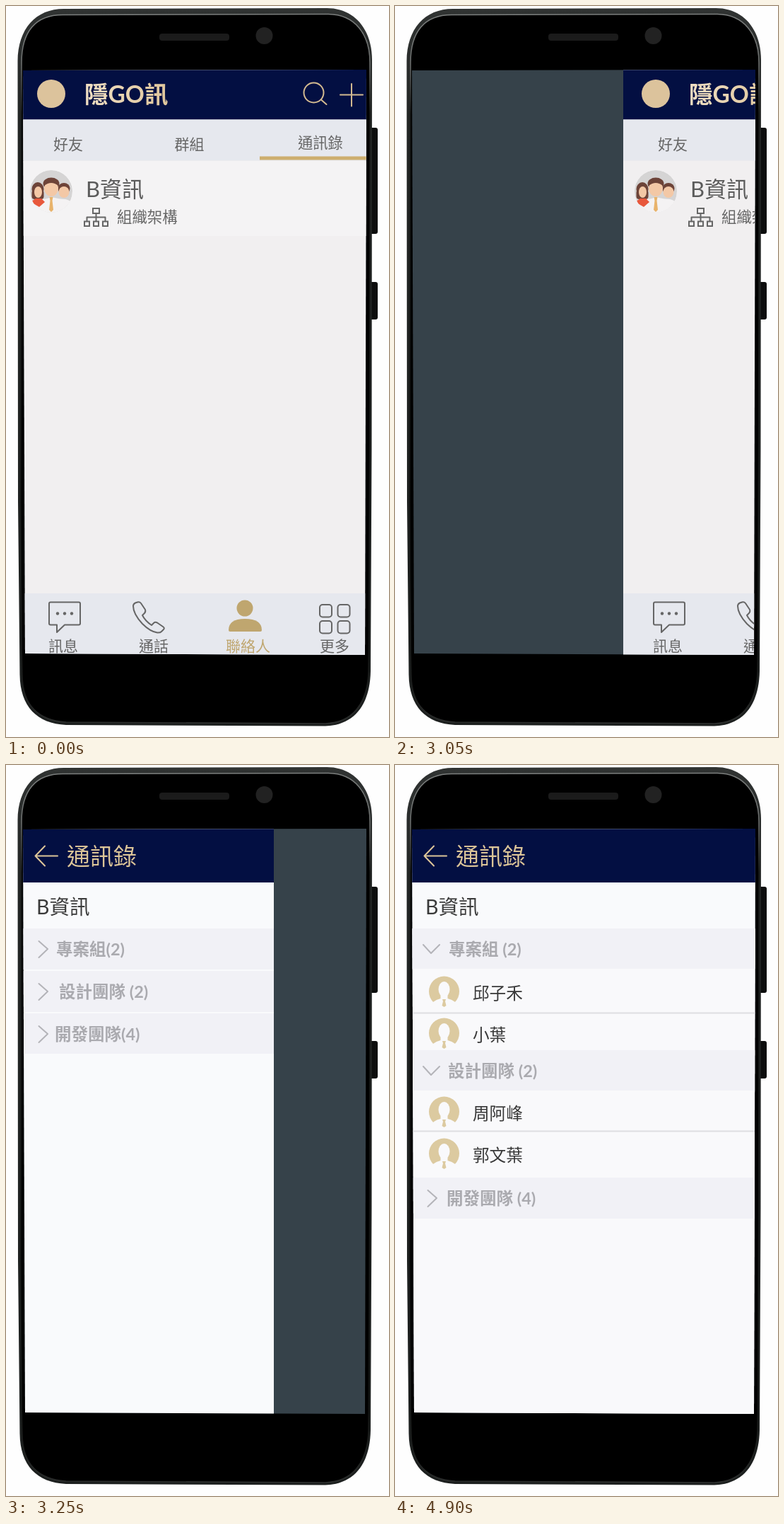
Write an HTML page that moves like this. It is 542 px wide and 1033 px high and loops after 5900 ms.

```html
<!DOCTYPE html>
<html lang="zh-Hant">
<head>
<meta charset="utf-8">
<style>
html, body { margin: 0; width: 100%; height: 100%; overflow: hidden; background: #fefefe; }
svg { display: block; width: 542px; height: 1033px; }
text { font-family: Lato, "Noto Sans CJK TC", "Noto Sans CJK JP", "Noto Sans CJK", sans-serif; white-space: pre; }
.line { fill: none; stroke-width: 2; stroke-linecap: round; stroke-linejoin: round; }
</style>
</head>
<body>
<svg viewBox="0 0 542 1033">
  <defs>
    <clipPath id="glass"><path d="M24 91L510 90L508 917L27 915Z"/></clipPath>
    <clipPath id="wipe"><rect id="wipeBox" x="0" y="80" width="0" height="850"/></clipPath>
    <clipPath id="round"><circle cx="64" cy="262" r="30"/></clipPath>
    <linearGradient id="shell" x1="0" y1="0" x2="0" y2="1">
      <stop offset="0" stop-color="#303332"/>
      <stop offset=".15" stop-color="#222524"/>
      <stop offset="1" stop-color="#1c1f1e"/>
    </linearGradient>
    <linearGradient id="rim" x1="0" y1="0" x2="0" y2="1">
      <stop offset="0" stop-color="#7c7f7e"/>
      <stop offset=".07" stop-color="#6a6d6c"/>
      <stop offset=".14" stop-color="#151716"/>
      <stop offset=".9" stop-color="#0d0e0d"/>
      <stop offset="1" stop-color="#2c2e2d"/>
    </linearGradient>
    <linearGradient id="gilt" x1="0" y1="0" x2="1" y2="0">
      <stop offset="0" stop-color="#f0dfc4"/>
      <stop offset="1" stop-color="#dfc69c"/>
    </linearGradient>
  </defs>

  <g fill="#0c0d0d">
    <rect x="510" y="172" width="16" height="150" rx="3"/>
    <rect x="510" y="390" width="16" height="53" rx="3"/>
  </g>
  <path fill="url(#shell)" d="M16.500 78C17 32 42 4 82 4L454 3C494 3 518 34 518 76L517.500 625L516 940C515 990 491 1016 452 1017.500L85 1016C44 1014 20 990 19.500 945L17 700Z"/>
  <path fill="#000" stroke="url(#rim)" stroke-width="1.600" d="M22 80C22 36 42 12.500 80 12.500L456 11.500C494 12 515 40 515 80L514.500 620L513 940C512 986 490 1013 452 1014L85 1012C46 1010 23 988 23 945L21 700Z"/>
  <rect x="217" y="39" width="99" height="10" rx="4" fill="#1b1b1b"/>
  <circle cx="365.500" cy="42" r="12" fill="#222"/>

  <g clip-path="url(#glass)">
    <rect x="20" y="85" width="495" height="836" fill="#36424a"/>
    <g id="home"></g>
    <g clip-path="url(#wipe)">
      <rect x="18" y="85" width="495" height="836" fill="#f9fafc"/>
      <rect x="18" y="85" width="495" height="81" fill="#030f42"/>
      <g id="head"></g>
      <g id="list0"></g>
      <g id="list1"></g>
      <g id="list2"></g>
    </g>
  </g>
</svg>

<script>
const $ = id => document.getElementById(id);
const GREY = '#666', GOLD = '#bfa66f', TAN = '#dcc598', BRASS = '#d3ba90';

// Text placed by its left edge and vertical centre
const text = (x, cy, size, fill, str, weight = 400) =>
  `<text x="${x}" y="${cy + size * .37}" font-size="${size}" fill="${fill}" font-weight="${weight}">${str}</text>`;
const rect = (x, y, w, h, fill, extra = '') =>
  `<rect x="${x}" y="${y}" width="${w}" height="${h}" fill="${fill}" ${extra}/>`;
const line = (d, stroke) => `<path class="line" stroke="${stroke}" d="${d}"/>`;
const shape = (d, fill) => `<path d="${d}" fill="${fill}"/>`;
const dot = (x, y, r, fill) => `<circle cx="${x}" cy="${y}" r="${r}" fill="${fill}"/>`;
const oval = (x, y, rx, ry, fill) => `<ellipse cx="${x}" cy="${y}" rx="${rx}" ry="${ry}" fill="${fill}"/>`;
const box = (x, y, w, h, r) => rect(x, y, w, h, 'none', `rx="${r}" stroke="${GREY}" stroke-width="2"`);

function team() {
  const hair = '#6d4338', skin = '#f3c8a6', shirt = '#f4f2f3';
  return `<g clip-path="url(#round)">` +
    dot(64, 262, 30, '#d5d4d4') +
    shape('M34 280Q36 274 46 273Q54 274 64 270Q76 273 84 273Q93 275 95 282V294H34Z', shirt) +
    oval(45, 259, 8.5, 10, hair) + rect(36.5, 260, 17, 13, hair, 'rx="4"') +
    shape('M35 277L42 272H50L55 277L47 284Z', '#e8583c') +
    oval(45.5, 263, 5.5, 8, skin) +
    oval(82, 258, 8.5, 8, hair) + oval(82, 263, 7.5, 8, skin) +
    oval(64, 251, 11.5, 8.5, hair) + oval(64, 258, 10, 11, skin) +
    shape('M54 254Q64 246 74 254V248Q64 239 54 248Z', hair) +
    shape('M61.5 270H66.500L65.500 275L67 288L64 291L61 288L62.500 275Z', '#e8b36b') + '</g>';
}

function home() {
  const tiles = [444, 469.5].map(x => [846, 869].map(y => box(x, y, 17, 17.5, 4)).join('')).join('');
  const nodes = [111, 124, 137].map(x => box(x, 304.5, 7, 6.5, 0)).join('');
  return rect(18, 85, 560, 836, '#f1eff0') +
    rect(18, 219, 560, 106, '#f4f3f4', 'id="press"') +
    rect(18, 85, 560, 75.5, '#030f42') +
    rect(18, 160.5, 560, 58, '#e6e8ee') +
    rect(18, 830, 560, 90, '#e6e8ee') +
    dot(64, 124, 20, '#dcc39c') +
    text(111, 124.5, 33.5, 'url(#gilt)', '隱GO訊', 700) +
    `<circle class="line" cx="435.500" cy="122.500" r="14" stroke="${BRASS}"/>` +
    line('M446 132.500L453.500 139M473 125.500H505M489 110V141.500', BRASS) +
    text(67, 195, 21, GREY, '好友') + text(238.5, 195, 21, GREY, '群組') +
    text(413, 193, 21.3, GREY, '通訊錄') +
    rect(359, 212.5, 160, 5, '#cdae6e') +
    team() +
    text(113, 259, 31, '#5b5b5b', 'B資訊') +
    box(123, 286, 9, 7, 0) + nodes +
    line('M127.500 293V304M114.500 304V298.500H140.500V304', GREY) +
    text(157, 298.5, 21.4, GREY, '組織架構') +
    line('M63 842.500H103Q105 842.500 105 844.500V872.500Q105 874.500 103 874.500H83L72 885V874.500H63Q61 874.500 61 872.500V844.500Q61 842.500 63 842.500Z', GREY) +
    [73, 83, 93].map(x => dot(x, 858.5, 2.2, GREY)).join('') +
    line('M180 848Q180 845 183 843.500L186 842.500Q189 841.500 191 844L197 853Q198 856 196 858L193 861Q197 869 206 875L209 872Q211 870 214 871.500L222 877Q225 879 223 881L220 884Q218 886 214 885.500Q204 884 193 873Q180 859 180 848Z', GREY) +
    dot(338, 851, 11.5, GOLD) +
    shape('M315 882Q315 866 338 866Q362 866 362 882Q362 884 360 884H317Q315 884 315 882Z', GOLD) +
    tiles +
    text(60, 904, 21, GREY, '訊息') + text(188, 904, 21, GREY, '通話') +
    text(311, 904, 21, GOLD, '聯絡人') + text(444, 904, 21, GREY, '更多');
}

// Group bar: y is the top, x the label's left edge
function group(y, x, label, open, h = 58) {
  const c = y + 29;
  const chevron = open ? `M40 ${c - 6}L51 ${c + 6}L63 ${c - 6}` : `M46.500 ${c - 11}L59 ${c}L46.500 ${c + 12}`;
  return rect(18, y, 495, h, '#f1f1f6') + line(chevron, '#b4b4b9') +
    text(x, c, 23.5, '#aaaaaf', label, 700);
}

function member(y, name) {
  return `<g transform="translate(69.500 ${y})">` +
    dot(0, 0, 21.5, '#dccaa0') +
    shape('M-20 23Q-18 13 -5 10V5H5V10Q18 13 20 23Z', '#f9f9fb') +
    oval(0, -3, 8, 11, '#f9f9fb') +
    shape('M-2.500 11H2.500L1.500 14L3 20L0 22L-3 20L-1.500 14Z', '#dccaa0') + '</g>' +
    text(110, y + 2.5, 23.6, '#383838', name);
}

const rule = y => rect(18, y, 495, 2, '#dedee2');
const sheet = rect(18, 231, 495, 690, '#f9f9fb');
const first = sheet + member(320, '邱子禾') + rule(349.5) + member(379, '小葉') +
  group(231, 76, '專案組 (2)', true, 57);

$('home').innerHTML = home();
$('head').innerHTML = line('M41.500 128.500H73M55 114.500L41.500 128.500L55 142.500', TAN) +
  text(86, 129, 33, TAN, '通訊錄') + text(43, 200, 28.5, '#3a3a3a', 'B資訊');
$('list0').innerHTML = group(231, 71, '專案組(2)') + group(291, 75, '設計團隊 (2)') + group(351, 69, '開發團隊(4)', false, 57);
$('list1').innerHTML = first + group(403, 75, '設計團隊 (2)', false, 57) + group(463, 73, '開發團隊 (4)');
$('list2').innerHTML = first + group(403, 75, '設計團隊 (2)', true, 57) +
  member(490, '周阿峰') + rule(516.5) + member(549, '郭文葉') + group(583, 73, '開發團隊 (4)');

const LOOP = 5900, STEP = 50, SPEED = 3;
const show = (id, on) => $(id).setAttribute('display', on ? 'inline' : 'none');

function draw(now) {
  const t = now % LOOP;
  const s = Math.floor(t / STEP) * STEP;
  const shift = s < 3000 ? 0 : 155 + (s - 3000) * SPEED;
  const edge = s < 3150 ? 0 : Math.min(520, 229 + (s - 3200) * SPEED);
  show('press', t < 1000);
  show('home', shift < 500);
  $('home').setAttribute('transform', `translate(${shift} 0)`);
  $('wipeBox').setAttribute('width', edge);
  show('list0', t < 3900);
  show('list1', t >= 3900 && t < 4900);
  show('list2', t >= 4900);
}

const start = performance.now();
function tick() {
  draw(performance.now() - start);
  requestAnimationFrame(tick);
}
tick();
</script>
</body>
</html>
```
